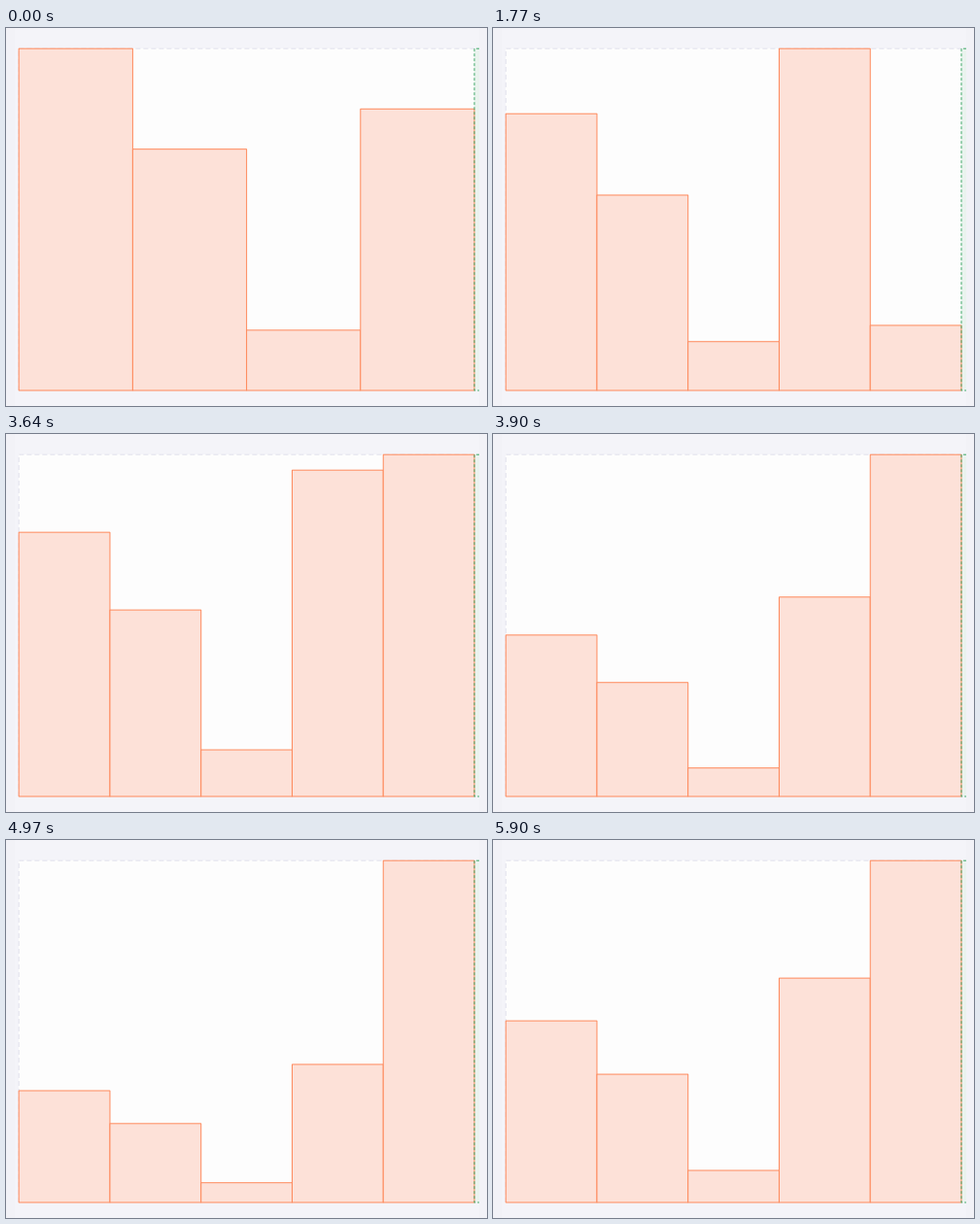
Animation, 495 px wide and 389 px high, one loop 8000 ms. Source, as a matplotlib script:

```python
import numpy as np
import matplotlib.pyplot as plt
from matplotlib.animation import FuncAnimation
from matplotlib.patches import Rectangle

W, H, DPI = 495, 389, 100
PX = 72 / DPI                      # one pixel in points
LOOP, DT = 8000, 20

LEFT, TOP, RIGHT, BASE = 13.2, 21.2, 482.0, 373.0
STRIP = 487                        # right end of the green strip
PAGE, EDGE, PLOT = "#f4f4f9", "#f2f2f7", "#fdfdfd"
FILL, STROKE = "#fde1d8", "#ff8a5c"
GUIDE, GREEN, MINT = "#e1e1ec", "#3fa869", "#eaf3ee"

# The last value is dragged up, down and then settles, 15 steps a second
DRAG_START, STEP = 3370, 1000 / 15
KEYS = {-1: 4, 8: 36, 12: 48, 16: 68, 18: 71, 20: 71,
        29: 28, 31: 29, 33: 38, 36: 38, 38: 32}


def dragged(t):
    step = np.floor((t - DRAG_START) / STEP + 0.1)
    return round(np.interp(step, list(KEYS), list(KEYS.values())))


def values_at(t):
    if t < 500:
        return [17, 12, 3, 14]
    second = 14 - np.clip((t - 580) // 60, 0, 2)
    values = [17, second, 3, 21]
    return values if t < 1770 else values + [dragged(t)]


fig = plt.figure(figsize=(W / DPI, H / DPI), dpi=DPI, facecolor=PAGE)
ax = fig.add_axes([0, 0, 1, 1])
ax.set_xlim(0, W)
ax.set_ylim(H, 0)
ax.axis("off")


def block(x0, y0, x1, y1, color, z):
    ax.add_patch(Rectangle((x0, y0), x1 - x0, y1 - y0, fc=color, lw=0, zorder=z))


def dashed(xs, ys, color, dash, z):
    ax.plot(xs, ys, color=color, lw=PX, ls=(0, dash), snap=False,
            dash_capstyle="butt", zorder=z)


block(0, 0, 9, H, EDGE, 0)
block(STRIP, 0, W, H, EDGE, 0)
block(LEFT, TOP, RIGHT, BASE, PLOT, 1)
block(RIGHT, TOP, STRIP, BASE, MINT, 1)
dashed([LEFT, LEFT, RIGHT], [BASE, TOP, TOP], GUIDE, (5, 3), 2)
dashed([STRIP, RIGHT, RIGHT, STRIP], [TOP, TOP, BASE, BASE], GREEN, (3, 2), 5)

bars = [
    ax.add_patch(Rectangle((0, 0), 1, 1, fc=FILL, ec=STROKE, lw=PX,
                           snap=False, joinstyle="miter", zorder=3))
    for _ in range(5)
]


def update(i):
    values = values_at(i * DT + DT / 2)
    width = (RIGHT - LEFT) / len(values)
    scale = (BASE - TOP) / max(values)
    for k, bar in enumerate(bars):
        bar.set_visible(k < len(values))
        if k < len(values):
            h = values[k] * scale
            bar.set_bounds(LEFT + k * width, BASE - h, width, h)
    return bars


anim = FuncAnimation(fig, update, frames=LOOP // DT, interval=DT,
                     init_func=lambda: update(0), repeat=True,
                     repeat_delay=0, blit=False)
plt.show()
```
